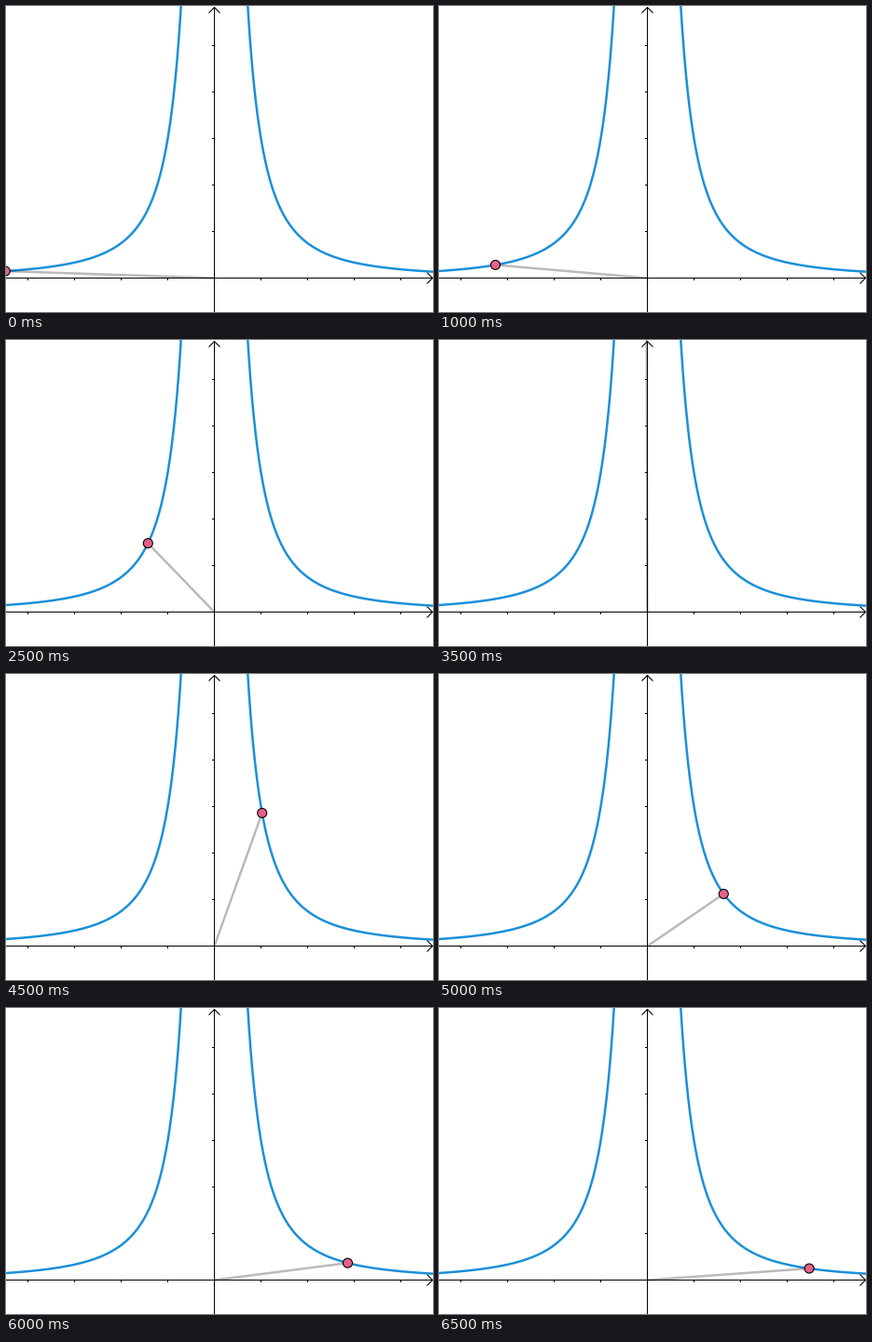
A matplotlib script that plays this animation: 458x329 px, repeating every 7000 ms.

```python
import numpy as np
import matplotlib.pyplot as plt
from matplotlib.animation import FuncAnimation
from matplotlib.patches import Circle

W, H, DPI = 458, 329, 64
OX, OY, UNIT = 223.5, 292.5, 50
FRAMES, INTERVAL = 14, 500
X_START, X_STEP = -4.484, 0.612


def px(n):
    """Pixels to points."""
    return n * 72 / DPI


def curve(x):
    return 3 / x ** 2


def to_stage(x, y):
    return OX + UNIT * x, OY - UNIT * y


fig = plt.figure(figsize=(W / DPI, H / DPI), dpi=DPI, facecolor="white")
ax = fig.add_axes([0, 0, 1, 1])
ax.set_xlim(0, W)
ax.set_ylim(H, 0)
ax.axis("off")


def stroke(xs, ys, **style):
    opts = dict(color="black", lw=px(1), solid_capstyle="butt",
                snap=False, zorder=1)
    opts.update(style)
    return ax.plot(xs, ys, **opts)[0]


# Axes with open arrowheads
stroke([0, W], [OY, OY])
stroke([OX, OX], [1, H])
stroke([W - 6.5, W - 0.5, W - 6.5], [OY - 6, OY, OY + 6], lw=px(1.1))
stroke([OX - 6, OX, OX + 6], [7.5, 1.5, 7.5], lw=px(1.1))

# Unit ticks
for k in range(-4, 5):
    if k:
        x, _ = to_stage(k, 0)
        stroke([x, x], [OY, OY + 2.5])
for k in range(1, 6):
    _, y = to_stage(0, k)
    stroke([OX - 2.5, OX], [y, y])

# Both branches
for side in (-1, 1):
    xs = side * np.linspace(0.68, 4.8, 400)
    stroke(*to_stage(xs, curve(xs)), color="#1b90d8", lw=px(2.5), zorder=2)

radius = stroke([], [], alpha=0.27, lw=px(2.5), zorder=3)
dot = ax.add_patch(Circle((0, 0), 5, fc="#e5608a", ec="black", lw=px(1.1),
                          zorder=4))


def update(i):
    x = X_START + X_STEP * i
    cx, cy = to_stage(x, curve(x))
    radius.set_data([OX, cx], [OY, cy])
    dot.center = cx, cy
    return radius, dot


anim = FuncAnimation(fig, update, frames=FRAMES, interval=INTERVAL,
                     init_func=lambda: update(0), repeat=True,
                     repeat_delay=0, blit=False)
plt.show()
```
